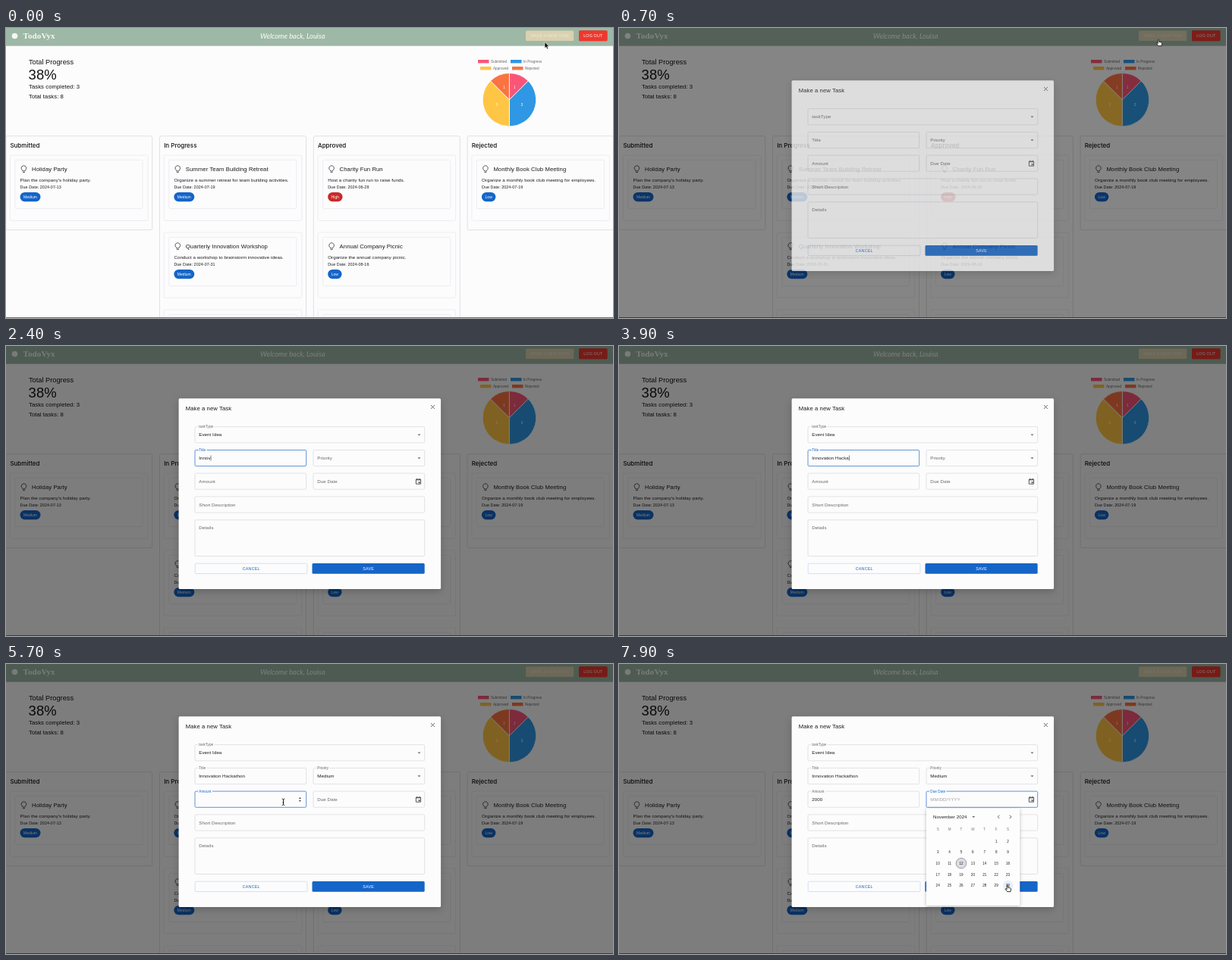
An HTML page for the animation above (8000 ms loop, 800x383 px).

```html
<!DOCTYPE html>
<html lang="en">
<head>
<meta charset="utf-8">
<title>Task board</title>
<style>
  html, body { margin: 0; width: 100%; height: 100%; overflow: hidden; background: #fcfcfd; }
  svg { display: block; width: 100%; height: 100%; }
  text { font-family: "Liberation Sans", Arial, sans-serif; letter-spacing: .01em; white-space: pre; }
  .head { font-family: Inter, sans-serif; font-weight: 500; letter-spacing: 0; }
  .brand { font-family: "Liberation Serif", serif; font-weight: 700; }
  .hello { font-family: Lato, cursive; font-style: italic; letter-spacing: 0; }
  .btn { letter-spacing: .02857em; }
  .raised { filter: drop-shadow(0 .5px .6px rgba(0, 0, 0, .25)); }
  .paper { filter: drop-shadow(0 1.5px 2px rgba(0, 0, 0, .28)); }
</style>
</head>
<body>
<svg id="stage" viewBox="0 0 800 383" xmlns="http://www.w3.org/2000/svg">
  <g id="board"></g>
  <rect id="shade" width="800" height="383"/>
  <g id="dialog"></g>
  <g id="pointer"></g>
</svg>
<script>
const LOOP = 8000, STEP = 100;
const BLUE = '#1565c8', RED = '#c92a2a', PAPER = '#fcfcfd', GREY = '#666', INK = '#1c1c1e';
const BODY = 6.16, SMALL = 4.62, BUTTON = 5.39, H6 = 7.7;
const $ = id => document.getElementById(id);

const text = (x, y, size, str, fill = INK, extra = '') =>
  `<text x="${x}" y="${y}" font-size="${size}" fill="${fill}" ${extra}>${str}</text>`;
const mid = (x, y, size, str, fill, cls = '') =>
  text(x, y, size, str, fill, `text-anchor="middle" class="${cls}"`);
const box = (x, y, w, h, fill, stroke = 'none', sw = .7, r = 1.5, extra = '') =>
  `<rect x="${x}" y="${y}" width="${w}" height="${h}" rx="${r}" fill="${fill}" stroke="${stroke}" stroke-width="${sw}" ${extra}/>`;
const line = (d, color = '#444', sw = .8) =>
  `<path d="${d}" fill="none" stroke="${color}" stroke-width="${sw}"/>`;
const arrow = (x, y) => `<path d="M${x - 2} ${y - 1}h4l-2 2z" fill="#666"/>`;

/* ---------- board ---------- */
const columns = [
  ['Submitted', [['Holiday Party', "Plan the company's holiday party.", '2024-07-13', 'Medium']]],
  ['In Progress', [
    ['Summer Team Building Retreat', 'Organize a summer retreat for team building activities.', '2024-07-19', 'Medium'],
    ['Quarterly Innovation Workshop', 'Conduct a workshop to brainstorm innovative ideas.', '2024-07-31', 'Medium'], null]],
  ['Approved', [
    ['Charity Fun Run', 'Host a charity fun run to raise funds.', '2024-06-28', 'High'],
    ['Annual Company Picnic', 'Organize the annual company picnic.', '2024-08-16', 'Low'], null]],
  ['Rejected', [['Monthly Book Club Meeting', 'Organize a monthly book club meeting for employees.', '2024-07-19', 'Low']]]
];
const chipWidth = { Medium: 27, High: 19.5, Low: 18.5 };

function card(x, y, data) {
  const frame = box(x + 5.5, y, 181.5, 86.3, PAPER, '#e9e9ed') + box(x + 12, y + 6.3, 168, 64.3, PAPER, '#e9e9ed');
  if (!data) return frame;
  const [title, info, due, level] = data, w = chipWidth[level];
  return frame +
    line(`M${x + 21.9} ${y + 20.9}v-.9a3.3 3.3 0 1 1 3.2 0v.9zM${x + 22} ${y + 22.6}h3`, '#333', .8) +
    text(x + 34, y + 21.4, H6, title) +
    text(x + 18.6, y + 34.6, BODY, info) +
    text(x + 18.6, y + 43.5, BUTTON, 'Due Date: ' + due) +
    box(x + 18.5, y + 49, w, 12.2, level === 'High' ? RED : BLUE, 'none', 0, 6.1) +
    mid(x + 18.5 + w / 2, y + 56.9, 5, level, '#fff');
}

function pie(cx, cy, r) {
  const at = (a, k) => [cx + k * Math.sin(a), cy - k * Math.cos(a)].map(v => v.toFixed(2)).join(' ');
  let from = 0;
  return [[1, '#fa5578'], [3, '#2f97e3'], [3, '#ffc545'], [1, '#fb7340']].map(([n, color]) => {
    const to = from + n * Math.PI / 4, m = (from + to) / 2;
    const slice = `<path d="M${cx} ${cy}L${at(from, r)}A${r} ${r} 0 0 1 ${at(to, r)}Z" fill="${color}" stroke="#fff" stroke-width=".8"/>` +
      mid(cx + 18 * Math.sin(m), cy - 18 * Math.cos(m) + 1.8, 5, n, '#fff');
    from = to;
    return slice;
  }).join('');
}

const legend = [
  [622, 42, '#fa5578', 'Submitted'], [665, 42, '#2f97e3', 'In Progress'],
  [625, 51, '#ffc545', 'Approved'], [667, 51, '#fb7340', 'Rejected']
];

$('board').innerHTML =
  box(0, 0, 800, 383, PAPER, 'none', 0, 0) +
  box(0, 0, 800, 23.5, '#9db8a6', 'none', 0, 0, 'class="raised"') +
  '<circle cx="11.5" cy="10.5" r="3.8" fill="#f4f7f4"/>' +
  text(22.5, 13.6, 11, 'TodoVyx', '#f6f9f6', 'class="brand"') +
  text(335, 13.8, 9.4, 'Welcome back, Louisa', '#fff', 'class="hello"') +
  box(685, 3.2, 63.5, 14, '#d9d1b0', 'none', 0, 1.5, 'class="raised"') +
  mid(717, 12.2, BUTTON, 'MAKE A NEW TASK', '#efe9d3', 'btn') +
  box(755, 3.2, 37.5, 14, '#f0372d', 'none', 0, 1.5, 'class="raised"') +
  mid(773.8, 12.2, BUTTON, 'LOG OUT', '#fff', 'btn') +
  text(30, 47.6, 9.24, 'Total Progress', '#111', 'style="letter-spacing:0"') +
  text(29.6, 67.8, 18.5, '38%', '#111', 'style="letter-spacing:0"') +
  text(30, 80.4, H6, 'Tasks completed: 3', '#111') +
  text(30, 93, H6, 'Total tasks: 8', '#111') +
  legend.map(([x, y, color, name]) => box(x, y, 14.5, 4.4, color, 'none', 0, 0) + text(x + 17, y + 3.9, SMALL, name, GREY)).join('') +
  pie(663.4, 94.8, 35.2) +
  columns.map(([name, cards], i) => {
    const x = i * 202.8;
    return box(x - .3, 142.7, 193, cards.length > 1 ? 260 : 124, PAPER, '#dadade', .8, 2) +
      text(x + 5.4, 158.1, 8, name, '#111', 'class="head"') +
      cards.map((c, k) => card(x, 168 + k * 102, c)).join('');
  }).join('') +
  box(0, 382, 800, 1, '#77707a', 'none', 0, 0);

/* ---------- dialog ---------- */
const pen = document.createElement('canvas').getContext('2d');
pen.font = '100px "Liberation Sans", Arial, sans-serif';
const widthOf = s => pen.measureText(s).width * BODY / 100 + s.length * BODY * .01;

function field(x, y, w, h, label, value, focus, caret) {
  const tone = focus ? BLUE : GREY, hint = value === 'MM/DD/YYYY';
  let out = box(x, y, w, h, 'none', focus ? '#3a79c8' : '#d2d2d6', focus ? .8 : .6);
  out += value || focus
    ? text(x + 5.3, y + 1.4, SMALL, label, tone, `stroke="${PAPER}" stroke-width="3" paint-order="stroke"`)
    : text(x + 5.3, y + 12.6, BODY, label, GREY);
  if (value) out += text(x + 5.3, y + 12.6, BODY, value, hint ? '#a2a2a6' : INK);
  if (caret) out += box(x + 5.4 + widthOf(value), y + 7, .5, 7.2, '#111', 'none', 0, 0);
  return out;
}

const menu = (x, y, w, items, lit) =>
  box(x, y, w, items.length * 13.9 + 6.2, '#fff', 'none', 0, 1.5, 'class="paper"') +
  items.map((s, i) => (i === lit ? box(x, y + 3.1 + i * 13.9, w, 13.9, '#eef0f4', 'none', 0, 0) : '') +
    text(x + 6, y + 12.2 + i * 13.9, BODY, s)).join('');

function calendar(hover) {
  const col = i => 420.2 + i * 15.4, row = i => 233.8 + i * 14.7;
  let out = box(405, 190.5, 123.3, 128.6, '#fdfdfe', 'none', 0, 1.5, 'class="paper"') +
    text(414, 203.9, BODY, 'November 2024', INK) + arrow(467.3, 201.9) +
    line('M501.5 199.7l-2.2 2.2 2.2 2.2M514.8 199.7l2.2 2.2-2.2 2.2', '#555', .9);
  [...'SMTWTFS'].forEach((s, i) => out += mid(col(i), 219.9, SMALL, s, '#777'));
  for (let d = 1; d <= 30; d++) {
    const k = d + 4, x = col(k % 7), y = row(Math.floor(k / 7));
    if (d === 12) out += `<circle cx="${x}" cy="${y}" r="6.8" fill="#dcdee5" stroke="#666" stroke-width=".6"/>`;
    if (d === 30 && hover) out += `<circle cx="${x}" cy="${y}" r="6.8" fill="#e9f0f9"/>`;
    out += mid(x, y + 1.7, SMALL, d, INK);
  }
  return out;
}

const TITLE = 'Innovation Hackathon';
const within = (t, a, b) => t >= a && t < b;
const typed = (s, n) => s.slice(0, Math.max(0, Math.floor(n)));

function dialog(t) {
  const title = typed(TITLE, (t - 1720) / 136), amount = typed('2000', (t - 6000) / 100);
  const onTitle = within(t, 1700, 4800), onAmount = within(t, 5500, 6900), onDate = t >= 6900;
  const L = 249, R = 405, half = 146.7, full = 302.7, h = 21.2;
  let out = box(227.6, 69.3, 345.5, 251.8, PAPER, 'none', 0, 1.6, 'style="filter:drop-shadow(0 3px 5px rgba(0,0,0,.2))"') +
    text(236.7, 84.5, H6, 'Make a new Task') +
    line('M560.1 78.1l4.8 4.8M564.9 78.1l-4.8 4.8', '#555', .9) +
    field(L, 106.6, full, h, 'taskType', t >= 1600 ? 'Event Idea' : '', within(t, 1200, 1700)) + arrow(544.5, 117.4) +
    field(L, 137.4, half, h, 'Title', title, onTitle, onTitle) +
    field(R, 137.4, half, h, 'Priority', t >= 5300 ? 'Medium' : '', within(t, 4800, 5500)) + arrow(544.5, 148.2) +
    field(L, 168.1, half, h, 'Amount', amount, onAmount, onAmount && amount) +
    field(R, 168.1, half, h, 'Due Date', onDate ? 'MM/DD/YYYY' : '', onDate) +
    line('M540.4 176.2h6.2v6h-6.2zM540.4 176.8h6.2M541.8 174.9v1.4M545.2 174.9v1.4', '#444', .9) +
    box(543.7, 179.3, 1.9, 1.9, '#444', 'none', 0, 0) +
    field(L, 198.9, full, h, 'Short Description', '') +
    field(L, 229.7, full, 47.8, 'Details', '') +
    box(249.2, 287.2, 147.8, 13.4, PAPER, '#b9cdea', .6) +
    mid(323.2, 295.5, BUTTON, 'CANCEL', BLUE, 'btn') +
    box(403.6, 287, 148, 13.7, BLUE, 'none', 0, 1.5, 'class="raised"') +
    mid(477.6, 295.5, BUTTON, 'SAVE', '#fff', 'btn');
  if (within(t, 5500, 6700)) out += '<path d="M385.9 178.1l1.5-2 1.5 2zM385.9 179.9l1.5 2 1.5-2z" fill="#444"/>';
  if (within(t, 1200, 1600)) out += menu(L, 127.8, full, ['Event Idea'], t >= 1400 ? 0 : -1);
  if (within(t, 4900, 5300)) out += menu(R, 158.6, half, ['Low', 'Medium', 'High'], t >= 5100 ? 1 : -1);
  if (t >= 7000) out += calendar(t >= 7800);
  return out;
}

/* ---------- pointer ---------- */
const shapes = {
  arrow: '<path d="M0 0v8l1.8-1.6 1.3 2.9 1.5-.6-1.3-2.8h2.4z" fill="#000" stroke="#fff" stroke-width=".6"/>',
  hand: '<path d="M-.8.8q.8-1.4 1.6 0v3l3 .7q1 .4.8 1.6l-.6 3.1h-4.2l-2.6-3.4q.2-1.2 1.3-.3l.7.6z" fill="#fff" stroke="#000" stroke-width=".8"/>',
  beam: line('M-1.8-4.2q1.8 0 1.8 1v6.4q0 1 1.8 1M1.8-4.2q-1.8 0-1.8 1v6.4q0 1-1.8 1M-1 .8h2', '#111', .8),
  none: ''
};
const path = [
  [0, 710, 18.5, 'arrow'], [300, 711, 14.5, 'hand'], [700, 711, 14.5, 'hand'],
  [800, 353.8, 206.8, 'arrow'], [1100, 300, 118, 'hand'], [1200, 300, 118, 'hand'],
  [1400, 290, 138, 'hand'], [1600, 290, 140, 'beam'], [1700, 300, 148, 'beam'], [1900, 300, 148, 'none'],
  [4600, 400, 150, 'arrow'], [4800, 440, 148, 'hand'], [5000, 440, 150, 'hand'], [5200, 432, 181, 'hand'],
  [5500, 365.5, 182.3, 'beam'], [6100, 365.5, 182.3, 'none'],
  [6600, 420, 182, 'beam'], [6800, 543, 179, 'hand'], [7100, 543, 179, 'hand'],
  [7800, 512, 291.5, 'hand'], [LOOP, 512, 291.5, 'hand']
];

function pointer(t) {
  const i = path.findIndex((p, k) => t < path[k + 1][0]);
  const [t0, x0, y0, kind] = path[i], [t1, x1, y1] = path[i + 1];
  const k = kind === 'none' || t0 === 700 ? 0 : (t - t0) / (t1 - t0);
  return `<g transform="translate(${x0 + (x1 - x0) * k} ${y0 + (y1 - y0) * k})">${shapes[kind]}</g>`;
}

/* ---------- clock ---------- */
const fades = { 600: [.4, .25], 700: [.95, .74] };
let last = -1;

function draw(now) {
  const t = Math.floor(now % LOOP / STEP) * STEP;
  if (t === last) return;
  last = t;
  const [shade, sheet] = fades[t] || (t < 600 ? [0, 0] : [1, 1]);
  $('shade').setAttribute('opacity', shade * .5);
  $('dialog').setAttribute('opacity', sheet);
  $('dialog').innerHTML = sheet ? dialog(t) : '';
  $('pointer').innerHTML = pointer(t);
}

const start = performance.now();
function tick() {
  draw(performance.now() - start);
  requestAnimationFrame(tick);
}
tick();
</script>
</body>
</html>
```
